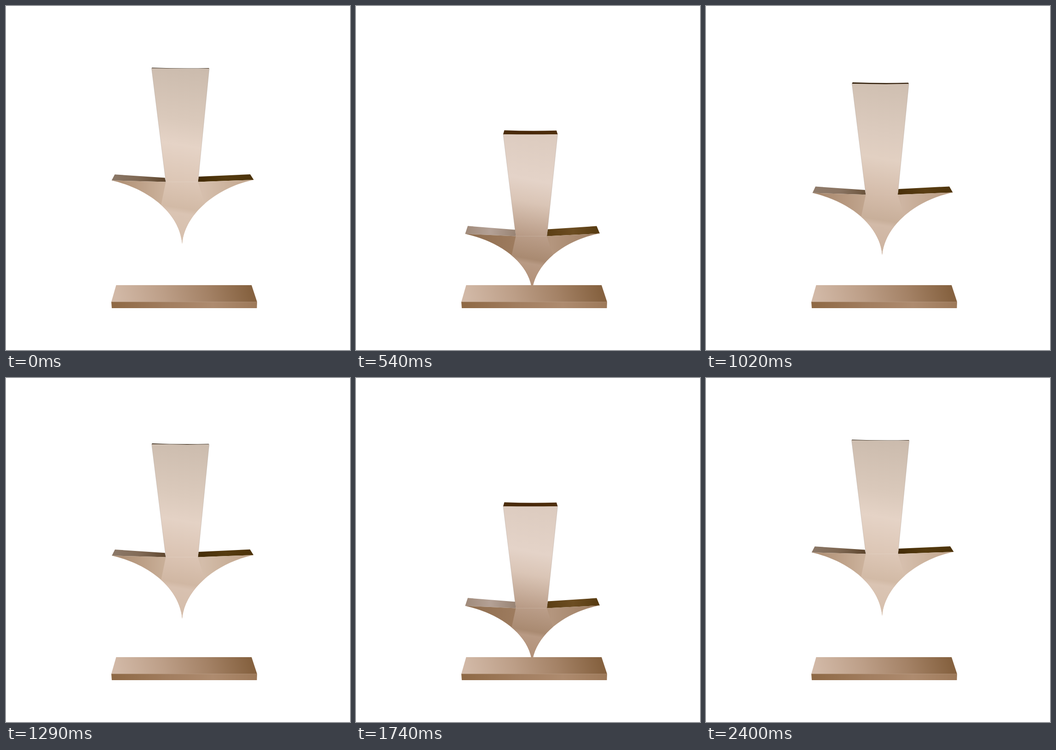
Recreate the animation shown at these times as an HTML page. Size 748x748 px, loop 2430 ms.

```html
<!DOCTYPE html>
<html lang="en">
<head>
<meta charset="utf-8">
<title>Arrow</title>
<style>
html, body { margin: 0; width: 100%; height: 100%; overflow: hidden; background: #fff; }
svg { display: block; width: 100vw; height: 100vh; }
</style>
</head>
<body>
<svg viewBox="0 0 748 748">
  <defs>
    <linearGradient id="stemFill" gradientUnits="userSpaceOnUse"></linearGradient>
    <linearGradient id="wingFill"></linearGradient>
    <linearGradient id="leftFill"></linearGradient>
    <linearGradient id="rightFill"></linearGradient>
    <linearGradient id="capFill"></linearGradient>
    <linearGradient id="barTop" gradientUnits="userSpaceOnUse" x1="245" y1="660" x2="525" y2="595">
      <stop offset="0" stop-color="#d2b9a7"/>
      <stop offset=".35" stop-color="#bd9f88"/>
      <stop offset=".68" stop-color="#a48266"/>
      <stop offset="1" stop-color="#866240"/>
    </linearGradient>
    <linearGradient id="barFront">
      <stop offset="0" stop-color="#8e6844"/>
      <stop offset=".4" stop-color="#a27e60"/>
      <stop offset=".7" stop-color="#ae8b6f"/>
      <stop offset="1" stop-color="#9d7959"/>
    </linearGradient>
    <clipPath id="bodyClip"><path id="bodyEdge"/></clipPath>
  </defs>
  <path id="left" fill="url(#leftFill)"/>
  <path id="right" fill="url(#rightFill)"/>
  <path id="cap" fill="url(#capFill)"/>
  <path id="body" fill="url(#wingFill)"/>
  <path id="flare" fill="url(#stemFill)" clip-path="url(#bodyClip)"/>
  <path id="stem" fill="url(#stemFill)"/>
  <path id="sides" fill="none" stroke="#7d7066" stroke-opacity=".4" stroke-width=".6"/>
  <path d="M239.5 607H534L546 643.5H229Z" fill="url(#barTop)"/>
  <path d="M229 643.3H546L545.5 657H230Z" fill="url(#barFront)"/>
</svg>
<script>
const $ = id => document.getElementById(id);
const LOOP = 2430, STEP = 30, CYCLE = 1200, DROP = 136.5;

// time, drop in px, speed in px per ms
const keys = [
  [0, 0, 0], [90, 8.2, .17], [420, 101, .31], [540, 136.5, .14], [615, 140.5, 0],
  [780, 114, -.27], [900, 76, -.36], [960, 53.5, -.37], [1080, 14.5, -.24], [1200, 0, 0]
];

// corners as x, y when raised and x, y when lowered
const corners = {
  faceL: [316.5, 135.5, 320, 279],   faceR: [442, 136, 438.5, 279],
  backL: [317.5, 134, 322.5, 270.2], backR: [441, 135, 436, 270.7],
  rootL: [347.5, 382.5, 347.5, 500.5], rootR: [417.5, 382.5, 415, 500.5],
  joinL: [345.5, 373.5, 346, 486.5], joinR: [419, 371, 417, 485.5],
  wingL: [236.5, 366.3, 243, 478.3], wingR: [531, 366, 523.3, 478.5],
  tipL: [229.7, 379.3, 237.3, 495.6], tipR: [538.7, 378, 530, 494.6],
  bendL: [310, 397.5, 314, 511.6],   bendR: [460, 394.5, 454, 508.6],
  dipL: [378, 450.5, 378, 559.6],    dipR: [389, 450.5, 389, 559.6],
  point: [383, 517.5, 383, 619.5],
  flareL: [335, 443, 336, 553],      flareR: [436, 443, 432, 553]
};

// offset, raised colour, lowered colour
const shades = {
  stemFill: [
    [0, 0xcbbbad, 0xdccbbf], [.3, 0xdac9bb, 0xe4d3c8], [.44, 0xe5d3c6, 0xdac5b6],
    [.65, 0xdcc6b5, 0xb99c87], [.79, 0xd2baa6, 0xa98a71], [.82, 0xdac4b3, 0xb89a84],
    [1, 0xd6bfac, 0xb08d74]
  ],
  wingFill: [
    [0, 0xac8c70, 0x8e6c4d], [.36, 0xcbb19b, 0x9d7b5e],
    [.64, 0xd6bfad, 0xb4967e], [1, 0xc1a58c, 0x9d7d62]
  ],
  leftFill: [[0, 0x8b7868, 0xa08a7a], [.5, 0x7f6853, 0xb4a196], [1, 0x5d452d, 0x988373]],
  rightFill: [[0, 0x432b05, 0x5b3e14], [.5, 0x543a0f, 0x6c4d22], [1, 0x4b3209, 0x563a10]],
  capFill: [[0, 0x30200f, 0x4b2d0c], [.5, 0x2a1a08, 0x472708], [1, 0x30200f, 0x50310e]]
};

const mix = (a, b, k) => a + (b - a) * k;
const tint = (a, b, k) => "rgb(" + [16, 8, 0].map(s =>
  Math.round(mix(a >> s & 255, b >> s & 255, Math.min(1, k)))) + ")";

function dropAt(t) {
  const i = Math.max(1, keys.findIndex(key => key[0] >= t));
  const [t0, y0, v0] = keys[i - 1], [t1, y1, v1] = keys[i];
  const w = t1 - t0, u = (t - t0) / w, r = 1 - u;
  return y0 * r * r * (1 + 2 * u) + y1 * u * u * (3 - 2 * u) + w * u * r * (v0 * r - v1 * u);
}

const stops = {};
for (const id in shades) {
  stops[id] = shades[id].map(([offset]) => {
    const stop = document.createElementNS("http://www.w3.org/2000/svg", "stop");
    stop.setAttribute("offset", offset);
    return $(id).appendChild(stop);
  });
}

function draw(t) {
  const k = dropAt(t % CYCLE) / DROP, p = {};
  for (const name in corners) {
    const [x0, y0, x1, y1] = corners[name];
    p[name] = [mix(x0, x1, k), mix(y0, y1, k)];
  }
  const at = names => names.split(" ").map(n => p[n].join()).join(" ");
  const poly = names => "M" + at(names) + "Z";
  const sag = (a, b, depth) => [(a[0] + b[0]) / 2, (a[1] + b[1]) / 2 + depth].join();
  const set = (id, d) => $(id).setAttribute("d", d);

  const faceSag = sag(p.faceL, p.faceR, 1);
  const body = "M" + at("tipL") + "C" + at("bendL dipL point") +
    "C" + at("dipR bendR tipR") + "L" + at("rootR rootL") + "Z";
  set("left", poly("wingL joinL rootL tipL"));
  set("right", poly("joinR wingR tipR rootR"));
  set("cap", "M" + at("backL") + "Q" + sag(p.backL, p.backR, 2) + " " + at("backR") +
    "L" + at("faceR") + "Q" + faceSag + " " + at("faceL") + "Z");
  set("body", body);
  set("bodyEdge", body);
  set("flare", poly("rootL rootR flareR point flareL"));
  set("stem", "M" + at("faceL") + "Q" + faceSag + " " + at("faceR") + "L" + at("rootR rootL") + "Z");
  set("sides", "M" + at("faceL rootL") + "M" + at("faceR rootR"));

  const fill = $("stemFill");
  fill.setAttribute("x1", 415);
  fill.setAttribute("x2", 355);
  fill.setAttribute("y1", p.faceL[1]);
  fill.setAttribute("y2", p.point[1]);
  for (const id in shades) {
    shades[id].forEach(([, a, b], i) => stops[id][i].setAttribute("stop-color", tint(a, b, k)));
  }
}

const start = performance.now();
function tick() {
  const t = (performance.now() - start) % LOOP;
  draw(Math.floor(t / STEP) * STEP);
  requestAnimationFrame(tick);
}
tick();
</script>
</body>
</html>
```
